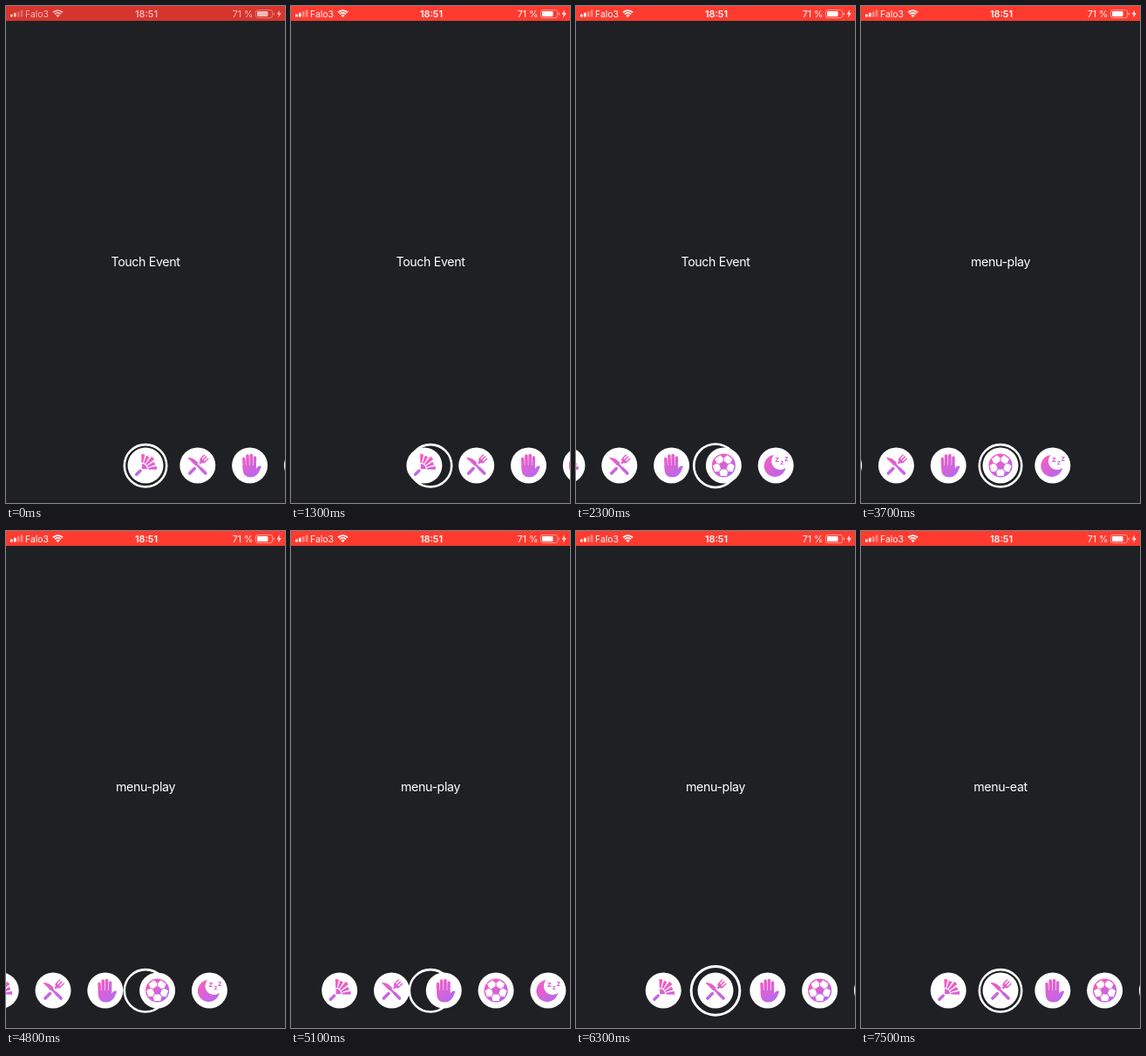
Write an HTML page with a canvas that moves like this. It is 320 px wide and 569 px high and loops after 8 s.

```html
<!DOCTYPE html>
<html lang="en">
<head>
<meta charset="utf-8">
<title>Touch menu</title>
<style>
html, body { margin: 0; width: 100%; height: 100%; overflow: hidden; background: #1f2023; }
canvas { display: block; width: 320px; height: 569px; }
</style>
</head>
<body>
<canvas id="stage"></canvas>
<script>
const W = 320, H = 569, LOOP = 8000;
const CX = 160, CY = 526, GAP = 59.8;
const FONT = 'Inter, "Open Sans", sans-serif';
const canvas = document.getElementById('stage');
const ctx = canvas.getContext('2d');
const dpr = window.devicePixelRatio || 1;
canvas.width = W * dpr;
canvas.height = H * dpr;

// Carousel offset over time: [ms, px]
const scrollKeys = [
  [0, 0], [1240, 0], [1350, 18], [1500, 70], [1700, 123], [2000, 154],
  [2300, 170], [2600, 177], [2900, 179.4], [4730, 179.4], [4800, 166],
  [5000, 120], [5200, 93], [5500, 73], [5800, 64.5], [6100, 60.6],
  [6300, 59.8], [8000, 59.8]
];
// Ring pulses: [start, length]
const pulses = [[2200, 960], [3700, 480], [5640, 960], [7000, 480]];

const clamp = (v, a = 0, b = 1) => Math.min(b, Math.max(a, v));

function slope(keys, i) {
  const a = keys[i - 1], b = keys[i], c = keys[i + 1];
  if (!a || !c) return 0;
  const l = (b[1] - a[1]) / (b[0] - a[0]);
  const r = (c[1] - b[1]) / (c[0] - b[0]);
  return l * r > 0 ? 2 * l * r / (l + r) : 0;
}

// Monotone cubic interpolation
function sample(keys, t) {
  let i = 0;
  while (i < keys.length - 2 && t >= keys[i + 1][0]) i++;
  const [t0, v0] = keys[i], [t1, v1] = keys[i + 1];
  const h = t1 - t0, u = (t - t0) / h, u2 = u * u, u3 = u2 * u;
  return v0 * (2 * u3 - 3 * u2 + 1) + v1 * (3 * u2 - 2 * u3) +
    h * (slope(keys, i) * (u3 - 2 * u2 + u) + slope(keys, i + 1) * (u3 - u2));
}

function ringScale(t) {
  let s = 1;
  for (const [start, len] of pulses) {
    const u = clamp((t - start) / len);
    s += 0.11 * (1 - Math.cos(2 * Math.PI * u));
  }
  return s;
}

function disc(x, y, r, color) {
  ctx.fillStyle = color;
  ctx.beginPath();
  ctx.arc(x, y, r, 0, 7);
  ctx.fill();
}

function line(x1, y1, x2, y2, width, cap = 'round') {
  ctx.lineWidth = width;
  ctx.lineCap = cap;
  ctx.beginPath();
  ctx.moveTo(x1, y1);
  ctx.lineTo(x2, y2);
  ctx.stroke();
}

function poly(points) {
  ctx.beginPath();
  points.forEach(([x, y]) => ctx.lineTo(x, y));
  ctx.closePath();
  ctx.fill();
}

function box(x, y, w, h, r) {
  ctx.beginPath();
  ctx.roundRect(x, y, w, h, r);
}

function label(text, x, y, size, weight = 400, align = 'left', spacing = 0) {
  ctx.font = `${weight} ${size}px ${FONT}`;
  ctx.letterSpacing = spacing + 'px';
  ctx.textAlign = align;
  ctx.fillText(text, x, y);
}

function brush() {
  ctx.rotate(Math.PI / 4);
  line(0, 14.6, 0, 8.4, 3.4);
  ctx.translate(0, 6);
  const band = (r0, r1, a, b) => {
    ctx.beginPath();
    ctx.arc(0, 0, r1, a, b);
    ctx.arc(0, 0, r0, b, a, true);
    ctx.fill();
  };
  const up = -Math.PI / 2;
  band(0.5, 6.2, up - 0.75, up + 0.75);
  for (let i = -2; i <= 2; i++) {
    const a = up + i * 0.35;
    band(7.3, 18.4 - Math.abs(i) * 0.6 - (i % 2 ? 1.6 : 0), a - 0.12, a + 0.12);
  }
}

function cutlery() {
  ctx.save();
  ctx.rotate(-Math.PI / 4);
  ctx.beginPath();
  ctx.moveTo(-2, -14.5);
  ctx.quadraticCurveTo(3.2, -11, 2.6, -1.5);
  ctx.lineTo(-2, -1.5);
  ctx.closePath();
  ctx.fill();
  line(0, -3, 0, 4, 2.6, 'butt');
  line(0, 5, 0, 12.8, 3.6);
  ctx.restore();
  ctx.save();
  ctx.rotate(Math.PI / 4);
  for (const x of [-3, 0, 3]) line(x, -14, x, -9, 1.5);
  ctx.beginPath();
  ctx.arc(0, -9, 3.75, 0, Math.PI);
  ctx.fill();
  line(0, -7, 0, -3.2, 2.4, 'butt');
  line(0, 5, 0, 12.8, 3.6);
  ctx.restore();
}

function hand() {
  line(-6.8, -7.6, -6.2, 3, 3.5);
  line(-2.6, -11, -2.4, 3, 3.6);
  line(1.7, -11.4, 1.6, 3, 3.6);
  line(5.8, -9, 5.6, 3, 3.5);
  ctx.beginPath();
  ctx.moveTo(-8.1, 0);
  ctx.lineTo(7.4, 0);
  ctx.lineTo(7.4, 4);
  ctx.quadraticCurveTo(9, 0.5, 12, 0.6);
  ctx.quadraticCurveTo(14, 1, 12.6, 3);
  ctx.quadraticCurveTo(9, 13.6, 1, 13.6);
  ctx.quadraticCurveTo(-8, 13.6, -8.1, 4);
  ctx.closePath();
  ctx.fill();
}

function ball(ink) {
  disc(0, 0, 13.6, ink);
  ctx.fillStyle = '#fff';
  const corners = [[5.1, -30], [8.6, -33], [12.5, -17], [12.5, 17], [8.6, 33], [5.1, 30]];
  for (let k = 0; k < 5; k++) {
    poly(corners.map(([r, deg]) => {
      const a = (deg + 36 + 72 * k - 90) * Math.PI / 180;
      return [r * Math.cos(a), r * Math.sin(a)];
    }));
  }
}

function moon() {
  ctx.beginPath();
  ctx.arc(-1, 0.5, 12.5, 0.183, 4.616);
  ctx.arc(5, -5, 10, -2.375, 0.891, true);
  ctx.fill();
  label('z', 1.5, -3.6, 9, 700, 'center');
  label('z', 7, -0.6, 7, 700, 'center');
  label('z', 12, -4.6, 8, 700, 'center');
}

const icons = [brush, cutlery, hand, ball, moon];

function drawMenu(t) {
  ctx.save();
  ctx.translate(CX, CY + 0.3);
  const s = ringScale(t);
  ctx.scale(s, s);
  ctx.strokeStyle = '#fff';
  ctx.lineWidth = 2.6;
  ctx.beginPath();
  ctx.arc(0, 0, 24.2, 0, 7);
  ctx.stroke();
  ctx.restore();

  const offset = sample(scrollKeys, t);
  const ink = ctx.createLinearGradient(-11, -12, 10, 12);
  ink.addColorStop(0, '#fa5cbd');
  ink.addColorStop(1, '#b569f0');
  icons.forEach((icon, i) => {
    ctx.save();
    ctx.translate(CX + i * GAP - offset, CY);
    disc(0, 0, 20.5, '#fff');
    ctx.fillStyle = ctx.strokeStyle = ink;
    icon(ink);
    ctx.restore();
  });
}

function drawStatus(t) {
  const lit = clamp(Math.floor(t / 100) / 2);
  const mix = (a, b) => Math.round(a + (b - a) * lit);
  ctx.fillStyle = `rgb(${mix(214, 255)},${mix(53, 59)},${mix(46, 48)})`;
  ctx.fillRect(0, 0, W, 17);

  const full = 0.65 + 0.35 * lit;
  ctx.globalAlpha = full;
  ctx.fillStyle = ctx.strokeStyle = '#fff';
  for (let i = 0; i < 4; i++) {
    const h = 3.2 + i * 1.6;
    ctx.globalAlpha = full * (i < 2 ? 1 : 0.4);
    box(5 + i * 3.9, 12.6 - h, 2.7, h, 0.6);
    ctx.fill();
  }
  ctx.globalAlpha = full;
  label('Falo3', 22, 12.8, 10.4);
  label('18:51', 161, 12.8, 10.8, 600, 'center');
  label('71 %', 283.5, 12.8, 10.6, 400, 'right');

  const a0 = -Math.PI * 0.75, a1 = -Math.PI * 0.25;
  ctx.lineCap = 'butt';
  ctx.lineWidth = 1.8;
  for (const r of [7.8, 5]) {
    ctx.beginPath();
    ctx.arc(59.5, 13, r, a0, a1);
    ctx.stroke();
  }
  ctx.beginPath();
  ctx.moveTo(59.5, 13);
  ctx.arc(59.5, 13, 3, a0, a1);
  ctx.fill();

  box(288, 6, 12.5, 6, 1);
  ctx.fill();
  ctx.globalAlpha = full * 0.55;
  ctx.lineWidth = 0.9;
  box(286.4, 4.5, 19.2, 9, 2.4);
  ctx.stroke();
  box(306.8, 7.4, 1.2, 3.2, 0.6);
  ctx.fill();
  ctx.globalAlpha = full;
  poly([[314, 4.5], [310.6, 9.6], [312.9, 9.6], [312.2, 13.4], [315.7, 8.2], [313.3, 8.2]]);
  ctx.globalAlpha = 1;
}

function draw(t) {
  ctx.setTransform(dpr, 0, 0, dpr, 0, 0);
  ctx.fillStyle = '#1f2023';
  ctx.fillRect(0, 0, W, H);
  drawStatus(t);
  ctx.fillStyle = '#fff';
  const text = t < 3700 ? 'Touch Event' : t < 7000 ? 'menu-play' : 'menu-eat';
  label(text, CX, 298, 14.2, 400, 'center', -0.35);
  drawMenu(t);
}

const start = performance.now();
function frame() {
  draw((performance.now() - start) % LOOP);
  requestAnimationFrame(frame);
}
frame();
</script>
</body>
</html>
```
